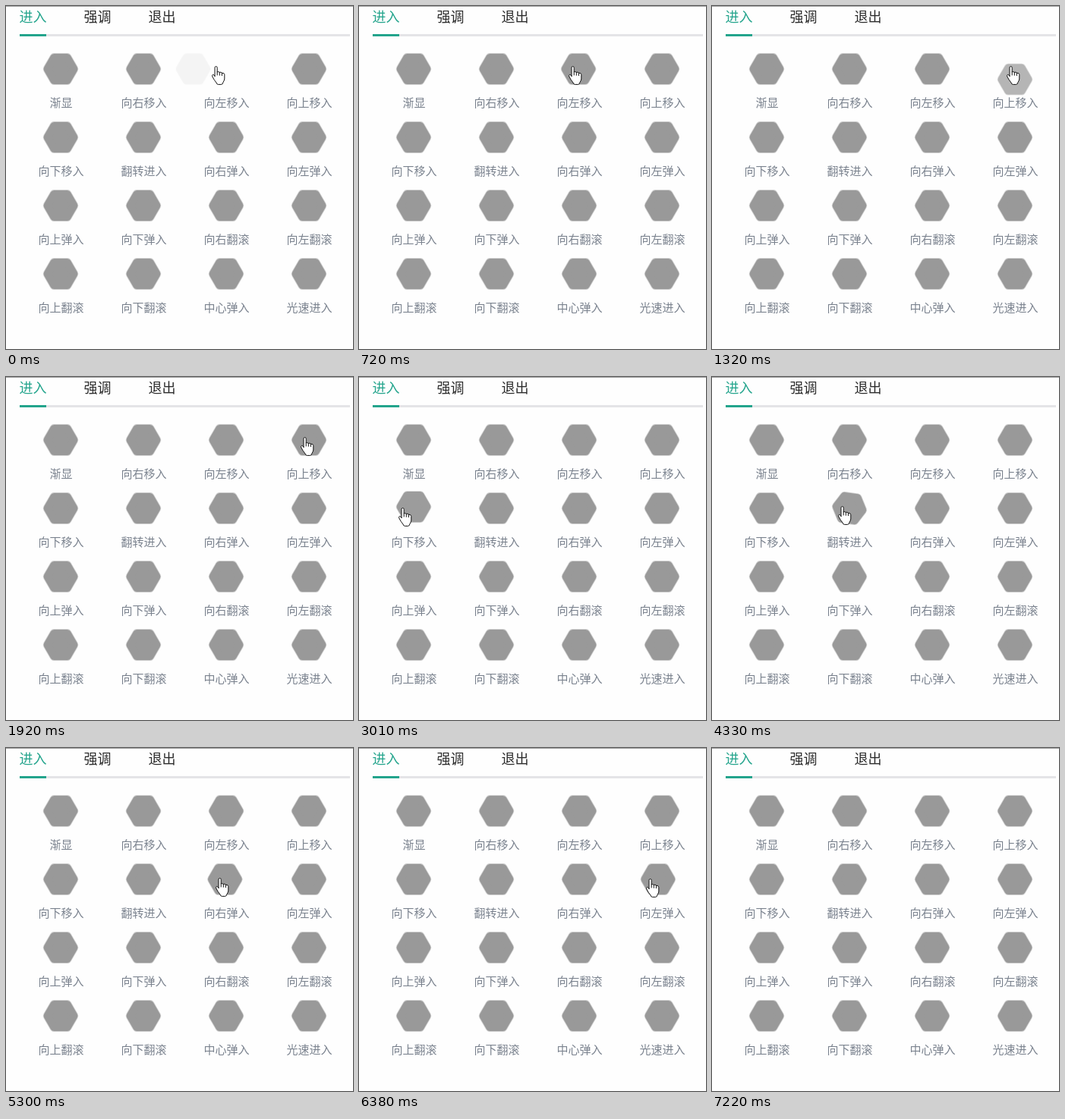
Animation of 457x452 px, one loop 8.09 s. Source, as an HTML page:

```html
<!DOCTYPE html>
<html lang="zh-CN">
<head>
<meta charset="utf-8">
<style>
  html, body { margin: 0; width: 100%; height: 100%; overflow: hidden; background: #fefefe; }
  svg { display: block; font-family: "Noto Sans CJK SC", "Noto Sans CJK", sans-serif; }
  .tab { font-size: 18px; fill: #2b2b2b; }
  .tab.active { fill: #23a48c; }
  .label { font-size: 15px; fill: #7a828e; text-anchor: middle; }
</style>
</head>
<body>
<svg width="457" height="452" viewBox="0 0 457 452">
  <defs>
    <path id="hexagon" d="M-17.3 0L-8.65 -15H8.65L17.3 0L8.65 15H-8.65Z" stroke-linejoin="round"/>
    <g id="hex">
      <use href="#hexagon" stroke="#cfcfcf" stroke-width="11.8"/>
      <use href="#hexagon" fill="#999" stroke="#999" stroke-width="10.2"/>
    </g>
  </defs>
  <rect width="457" height="1" fill="#a0a0a0"/>
  <rect x="18" y="37" width="435" height="3" fill="#e4e4e7"/>
  <rect x="18" y="37" width="35" height="3" fill="#23a48c"/>
  <text class="tab active" x="17.5" y="21">进入</text>
  <text class="tab" x="102.5" y="21">强调</text>
  <text class="tab" x="187.5" y="21">退出</text>
  <g id="tiles"></g>
  <g id="cursor" fill="#fff" stroke="#111" stroke-linejoin="round" stroke-linecap="round">
    <path d="M4 13.5V2.4Q4 .6 5.6 .6Q7.2 .6 7.2 2.4V8Q8.8 6.8 10.2 8.4Q12 7.6 13.4 9.2Q16.6 9 16.8 11.5V17Q16.6 19 15 21.5Q14.5 24.4 12.5 24.4H8.5Q6.5 24.4 6 22Q3 18.5 .8 14Q.2 12 1.4 11.4Q2.8 11 4 13.5Z"/>
    <path d="M7.2 8V12M10.3 8.6V12.3M13.4 9.4V12.7" fill="none"/>
  </g>
</svg>
<script>
const LOOP = 8090, CURSOR_GONE = 7200;
const STEPS = 60, STEP = 7220 / STEPS, STEP_LEAD = 6;
const SVG = 'http://www.w3.org/2000/svg';
const labels = ['渐显', '向右移入', '向左移入', '向上移入', '向下移入', '翻转进入', '向右弹入', '向左弹入',
  '向上弹入', '向下弹入', '向右翻滚', '向左翻滚', '向上翻滚', '向下翻滚', '中心弹入', '光速进入'];

// The cursor rests on each stop, then glides to the next one
const cursorStart = { x: 271, y: 79 };
const glides = [
  { start: 0, end: 720, x: 276, y: 79 },
  { start: 720, end: 1100, x: 388, y: 79 },
  { start: 1920, end: 2530, x: 17, y: 181 },
  { start: 2600, end: 3000, x: 52, y: 172 },
  { start: 3000, end: 4200, x: 166, y: 170 },
  { start: 4330, end: 4900, x: 276, y: 171 },
  { start: 5400, end: 6100, x: 378, y: 172 }
];

function cursorAt(t) {
  let { x, y } = cursorStart;
  for (const glide of glides) {
    const k = Math.min(1, Math.max(0, (t - glide.start) / (glide.end - glide.start)));
    const p = k * k * (3 - 2 * k);
    x += (glide.x - x) * p;
    y += (glide.y - y) * p;
  }
  return [Math.round(x), Math.round(y)];
}

// CSS "ease": cubic-bezier(.25, .1, .25, 1)
function ease(x) {
  if (x <= 0 || x >= 1) return x <= 0 ? 0 : 1;
  let lo = 0, hi = 1;
  for (let i = 0; i < 24; i++) {
    const s = (lo + hi) / 2;
    if (.75 * s * (1 - s) + s ** 3 < x) lo = s; else hi = s;
  }
  return .3 * lo * (1 - lo) ** 2 + 3 * lo * lo * (1 - lo) + lo ** 3;
}

const fadeFrom = (dx, dy, turn = 0) => ms => {
  const p = ease(ms / 1000), rest = 1 - p;
  return { x: dx * rest, y: dy * rest, angle: turn * rest, opacity: p };
};

// Out of sight for 600 ms, then a damped swing
const bounceFrom = side => ms => {
  const s = ms - 600;
  return {
    x: side * 5.5 * Math.exp(-s / 130) * Math.cos(s * Math.PI / 160),
    y: 0, angle: 0, opacity: s < 0 ? 0 : 1
  };
};

const atRest = { x: 0, y: 0, angle: 0, opacity: 1 };
const entrances = [
  { tile: 2, start: -100, pose: fadeFrom(-48, 0) },
  { tile: 3, start: 900, pose: fadeFrom(0, 48) },
  { tile: 4, start: 2260, pose: fadeFrom(0, -48) },
  { tile: 5, start: 3580, pose: fadeFrom(0, 0, 200) },
  { tile: 6, start: 4570, pose: bounceFrom(1) },
  { tile: 7, start: 5770, pose: bounceFrom(-1) }
];

function add(tag, attributes, text = '') {
  const node = document.createElementNS(SVG, tag);
  for (const name in attributes) node.setAttribute(name, attributes[name]);
  node.textContent = text;
  return document.getElementById('tiles').appendChild(node);
}

const tiles = labels.map((label, i) => {
  const x = 72 + 109 * (i % 4), y = 83 + 90 * Math.floor(i / 4);
  add('text', { class: 'label', x: x + .5, y: y + 50 }, label);
  return { x, y, node: add('use', { href: '#hex', transform: `translate(${x} ${y})` }) };
});
const cursor = document.getElementById('cursor');

// The picture advances in even steps and holds the last one
const stepTime = t => Math.min(STEPS, Math.floor((t + STEP_LEAD) / STEP)) * STEP;

function draw(now) {
  const t = stepTime(now % LOOP);
  for (const { tile, start, pose } of entrances) {
    const { x, y, node } = tiles[tile];
    const p = t < start ? atRest : pose(t - start);
    node.setAttribute('transform', `translate(${x + p.x} ${y + p.y}) rotate(${p.angle})`);
    node.setAttribute('opacity', p.opacity);
  }
  const [x, y] = cursorAt(t);
  cursor.setAttribute('transform', `translate(${x} ${y})`);
  cursor.setAttribute('visibility', t < CURSOR_GONE ? 'visible' : 'hidden');
}

const begin = performance.now();
function tick() {
  draw(performance.now() - begin);
  requestAnimationFrame(tick);
}
tick();
</script>
</body>
</html>
```
